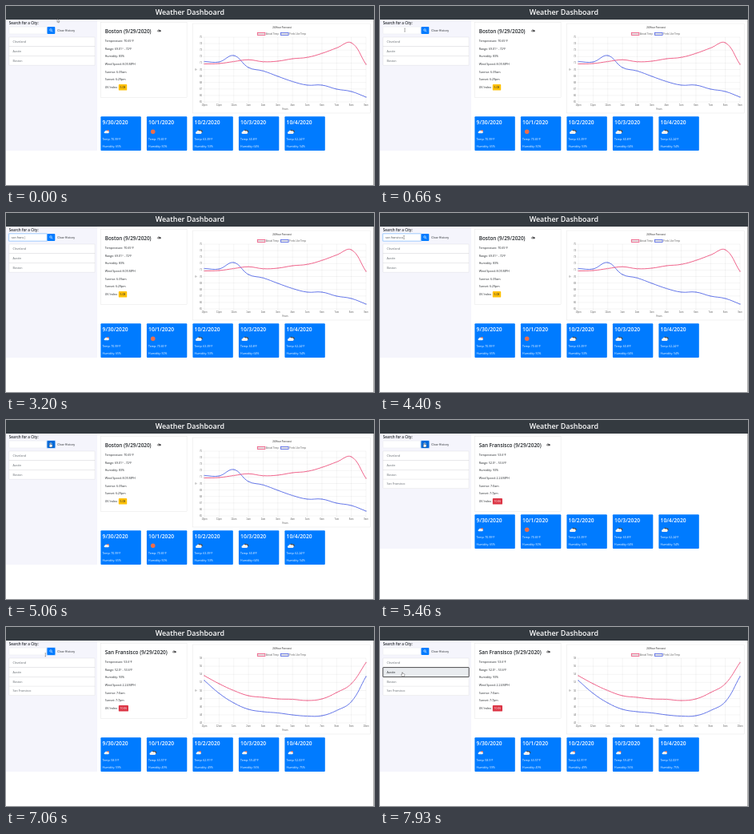
Recreate the animation shown at these times as an HTML page. Size 460 px wide and 224 px high, loop 8 s.

```html
<!DOCTYPE html>
<html lang="en">
<head>
<meta charset="utf-8">
<title>Weather Dashboard</title>
<style>
html, body { margin: 0; width: 100%; height: 100%; overflow: hidden; background: #fff; }
svg { display: block; width: 100%; height: 100%; font-family: "Open Sans", "Noto Sans", sans-serif; }
.chart text { font-family: "Liberation Sans", Arial, sans-serif; fill: #666; }
</style>
</head>
<body>
<svg id="stage" viewBox="0 0 460 224"></svg>
<script>
const LOOP = 8000, BLUE = '#007bff', RED_LINE = '#ee4a78', BLUE_LINE = '#4a5fe6';
const stage = document.getElementById('stage');

const boston = {
  name: 'Boston', iconX: 191,
  facts: ['Temperature: 70.65°F', 'Range: 69.01° - 72°F', 'Humidity: 83%', 'Wind Speed: 8.05 MPH',
    'Sunrise: 6:39am', 'Sunset: 6:29pm'],
  uv: '5.08', uvFill: '#ffc107', uvInk: '#212529',
  days: [['few', 70.99, 65], ['sun', 70.65, 50], ['cloud', 63.39, 53], ['cloud', 60.8, 64], ['cloud', 62.24, 54]],
  low: 65, high: 75, step: 1, hour: 22,
  actual: [72.5, 72, 69.5, 67.3, 69.7, 69, 66, 64.3, 59.3, 52.5, 46, 73],
  feels: [69.5, 70, 62, 77, 81.3, 88, 94.5, 99, 99, 104, 107, 114]
};
const sanFransisco = {
  name: 'San Fransisco', iconX: 210,
  facts: ['Temperature: 53.6°F', 'Range: 52.0° - 53.6°F', 'Humidity: 93%', 'Wind Speed: 2.24 MPH',
    'Sunrise: 7:0am', 'Sunset: 7:7pm'],
  uv: '10.06', uvFill: '#dc3545', uvInk: '#fff',
  days: [['few', 58.5, 59], ['cloud', 63.57, 49], ['few', 62.91, 49], ['few', 59.47, 56], ['few', 52.03, 75]],
  low: 42, high: 58, step: 2, hour: 23,
  actual: [61, 71, 79.5, 86, 88, 90, 90.5, 92, 90, 82, 71, 44.5],
  feels: [67, 83, 95, 103, 106, 107.5, 110, 111.5, 111, 104.5, 93.5, 62]
};

const rect = (x, y, w, h, fill, more = '') =>
  `<rect x="${x}" y="${y}" width="${w}" height="${h}" fill="${fill}" ${more}/>`;
const text = (x, y, size, s, fill = '#212529', more = '') =>
  `<text x="${x}" y="${y}" font-size="${size}" fill="${fill}" ${more}>${s}</text>`;
const line = (x1, y1, x2, y2) =>
  `<path d="M${x1} ${y1}L${x2} ${y2}" stroke="#000" stroke-opacity=".13" stroke-width=".35"/>`;
const circle = (x, y, r, fill, more = '') => `<circle cx="${x}" cy="${y}" r="${r}" fill="${fill}" ${more}/>`;
const BOLD = 'font-weight="600"', MID = 'text-anchor="middle"', END = 'text-anchor="end"';
const EDGE = 'stroke="#000" stroke-opacity=".13" stroke-width=".4"';

const puff = (x, y, s, fill) =>
  `<path transform="translate(${x} ${y}) scale(${s})" fill="${fill}"
    d="M-3 2.2a1.5 1.5 0 0 1 0-3a2.2 2.2 0 0 1 4-.8a1.9 1.9 0 0 1 2 3.8z"/>`;

function icon(kind, x, y) {
  if (kind === 'sun') return circle(x, y, 2.8, '#ec6e4c');
  if (kind === 'few') return circle(x + 1.2, y - .8, 1.6, '#ec6e4c') + puff(x - .4, y + .4, .72, '#f2f2f2');
  return puff(x + 1.2, y - .5, .8, '#48484a') + puff(x - .2, y + .7, .9, '#f2f2f2');
}

// Smooth curve with tension 0.4 through evenly spaced points.
function curve(ys, grow, color) {
  const p = ys.map((y, i) => [248 + i * 202 / 11, 120 + (y - 120) * grow]);
  const ctrl = p.map((c, i) => {
    const a = p[i - 1] || c, b = p[i + 1] || c;
    const da = Math.hypot(c[0] - a[0], c[1] - a[1]), db = Math.hypot(b[0] - c[0], b[1] - c[1]);
    const at = k => [c[0] + k * (b[0] - a[0]), c[1] + k * (b[1] - a[1])];
    return [at(-.4 * da / (da + db)), at(.4 * db / (da + db))];
  });
  let d = 'M' + p[0];
  for (let i = 1; i < p.length; i++) d += `C${ctrl[i - 1][1]} ${ctrl[i][0]} ${p[i]}`;
  return `<path d="${d}" fill="none" stroke="${color}" stroke-width=".85"/>` +
    p.map(([x, y]) => circle(x, y, .65, '#e5e5e5', `stroke="${color}" stroke-width=".3"`)).join('');
}

function chart(c, grow) {
  const legend = (x, s, color) =>
    rect(x, 33.5, 9.6, 2.9, '#e5e5e5', `stroke="${color}" stroke-width=".8"`) + text(x + 10.8, 36, 2.87, s);
  let out = rect(233.3, 22, 222.4, 112, '#fff', EDGE) +
    text(345, 28, 2.87, '24 Hour Forecast', '', MID + ' font-weight="bold"') +
    legend(314.3, 'Actual Temp', RED_LINE) + legend(343.5, 'Feels Like Temp', BLUE_LINE);
  for (let v = c.low; v <= c.high; v += c.step) {
    const y = 120 - 81 * (v - c.low) / (c.high - c.low);
    out += line(246, y, 450, y) + text(245.2, y + 1, 2.87, v, '', END);
  }
  for (let i = 0; i < 12; i++) {
    const x = 248 + i * 202 / 11, h = (c.hour + i) % 24;
    out += line(x, 39, x, 122) + text(x, 125, 2.87, (h % 12 || 12) + (h < 12 ? 'am' : 'pm'), '', MID);
  }
  out += text(349, 130.3, 2.87, 'Hours', '', MID) +
    text(0, 0, 2.87, '°F', '', MID + ' transform="translate(239 79.5) rotate(-90)"');
  return `<g class="chart">${out}${curve(c.feels, grow, BLUE_LINE)}${curve(c.actual, grow, RED_LINE)}</g>`;
}

function today(c) {
  return rect(118.3, 20.5, 107.8, 93.8, '#fff', EDGE) +
    text(123.7, 33.6, 6.4, c.name + ' (9/29/2020)', '#212529', BOLD) +
    puff(c.iconX + .5, 31, .55, '#48484a') + puff(c.iconX - .8, 31, .35, '#bbb') +
    c.facts.map((s, i) => text(123.7, 45.2 + i * 9.58, 3.6, s)).join('') +
    text(123.7, 103, 3.6, 'UV Index:') +
    rect(140.8, 98, c.uv.length > 4 ? 12.2 : 10.4, 7.6, c.uvFill, 'rx=".9"') +
    text(142.6, 103, 3.4, c.uv, c.uvInk);
}

const forecast = (c, y) => c.days.map(([kind, temp, hum], i) => {
  const x = 118.4 + i * 57.5, tx = x + 2.2;
  return rect(x, y, 50.4, 42.7, BLUE, 'rx=".9"') +
    text(tx, y + 9.3, 6.7, ['9/30', '10/1', '10/2', '10/3', '10/4'][i] + '/2020', '#fff', BOLD) +
    icon(kind, x + 7.8, y + 19) +
    text(tx, y + 29.4, 3.45, `Temp: ${temp}°F`, '#fff') +
    text(tx, y + 38.7, 3.45, `Humidity: ${hum}%`, '#fff');
}).join('');

const QUERY = 'san fransisco';
const KEYS = [1060, 1400, 1600, 1860, 2060, 2270, 2460, 2660, 3200, 3270, 3400, 3460, 3860];

function pointer(t) {
  if (t >= 1060 && t < 4400) return null;
  const moves = [[60, 730, 64, 16, 30, 30.5], [4400, 5060, 30, 30.5, 55.2, 28.8], [6860, 7530, 55.2, 28.8, 28, 56.6]];
  const [a, b, x0, y0, x1, y1] = moves[t < 1060 ? 0 : t < 6800 ? 1 : 2];
  const k = Math.min(1, Math.max(0, (t - a) / (b - a))), e = k * k * (3 - 2 * k);
  return { x: x0 + (x1 - x0) * e, y: y0 + (y1 - y0) * e };
}

const inside = (p, x0, y0, x1, y1) => p && p.x >= x0 && p.x < x1 && p.y >= y0 && p.y < y1;

function drawPointer(p, kind) {
  const d = {
    arrow: 'M0 0V4.4L1 3.5L1.7 5L2.4 4.7L1.8 3.2H3.1Z',
    hand: 'M-.5 .3Q0-.5 .5 .3V1.6L2.5 2.2Q3 2.4 2.8 3.5L2.3 5.2H-.4L-1.7 3.3Q-1.6 2.5-.5 3Z',
    beam: 'M-.7-2H.7M0-2V2M-.7 2H.7'
  }[kind];
  return `<path transform="translate(${p.x} ${p.y})" d="${d}" fill="#fff" stroke="#222" stroke-width=".35"/>`;
}

function sidebar(t, p, height) {
  const typing = t >= 730 && t < 5060, clicked = t >= 5060 && t < 7930;
  const overButton = inside(p, 51.3, 26, 61.5, 35), overList = inside(p, 4, 39, 111, 85.6);
  const halo = 'rx="1.4" fill-opacity=".25"';
  let out = rect(0, 17, 114, height, '#f5f5fc') +
    text(3.8, 23, 4.55, 'Search for a City:', '#212529', BOLD);
  if (typing) out += rect(2.8, 25.2, 49.4, 10.6, BLUE, halo);
  out += rect(3.7, 26.1, 47.4, 8.8, '#fff', `rx=".9" stroke="${typing ? '#80bdff' : '#e3e5ea'}" stroke-width=".4"`);
  if (typing) {
    const n = KEYS.filter(k => k <= t).length;
    out += text(6.8, 31.8, 3.64, QUERY.slice(0, n) + (t < 3860 ? '|' : ''), '#495057');
  }
  if (clicked) out += rect(50.6, 25.2, 11.6, 10.6, BLUE, halo);
  out += rect(51.5, 26, 9.8, 9, overButton ? '#0069d9' : BLUE, 'rx=".9"') +
    '<path d="M57 31.1L58.2 32.3" stroke="#fff" stroke-width=".7"/>' +
    circle(56, 30, 1.3, 'none', 'stroke="#fff" stroke-width=".55"') +
    text(64.2, 31.8, 3.64, 'Clear History');
  const cities = ['Cleveland', 'Austin', 'Boston'];
  if (t >= 5200) cities.push('San Fransisco');
  cities.forEach((s, i) => {
    const y = 39 + i * 11.7;
    const hover = inside(p, 4, y, 111, y + 11.7), press = i === 1 && t >= 7930;
    out += rect(3.9, y, 107.1, 11.7, press ? '#e9ecef' : hover ? '#f3f4f6' : '#fff', EDGE) +
      text(8.5, y + 7.1, 3.64, s, press ? '#212529' : '#62686e');
  });
  if (t >= 7930) out += rect(3.7, 50.6, 107.5, 11.9, 'none', 'rx=".5" stroke="#111" stroke-width=".7"');
  if (p) out += drawPointer(p, overButton || overList ? 'hand' : inside(p, 4, 26, 51, 35) ? 'beam' : 'arrow');
  return out;
}

function render(t) {
  const p = pointer(t), city = t < 5200 ? boston : sanFransisco;
  const waiting = t >= 5200 && t < 5530;
  const grow = t < 5200 || t >= 5660 ? 1 : 1 - (1 - (t - 5450) / 210) ** 4;
  const top = waiting ? 118.3 : 138.3;
  stage.innerHTML = rect(0, 0, 460, 224, '#fff') +
    today(city) + (waiting ? '' : chart(city, grow)) +
    forecast(t < 5530 ? boston : sanFransisco, top) +
    rect(0, 0, 460, 17, '#343a40') +
    text(229.8, 11.3, 8.95, 'Weather Dashboard', '#fff', MID + ' ' + BOLD) +
    rect(459.4, 17, .6, 207, '#777') +
    sidebar(t, p, top + 42.7 - 17);
}

const start = performance.now();
function tick() {
  render((performance.now() - start) % LOOP);
  requestAnimationFrame(tick);
}
tick();
</script>
</body>
</html>
```
